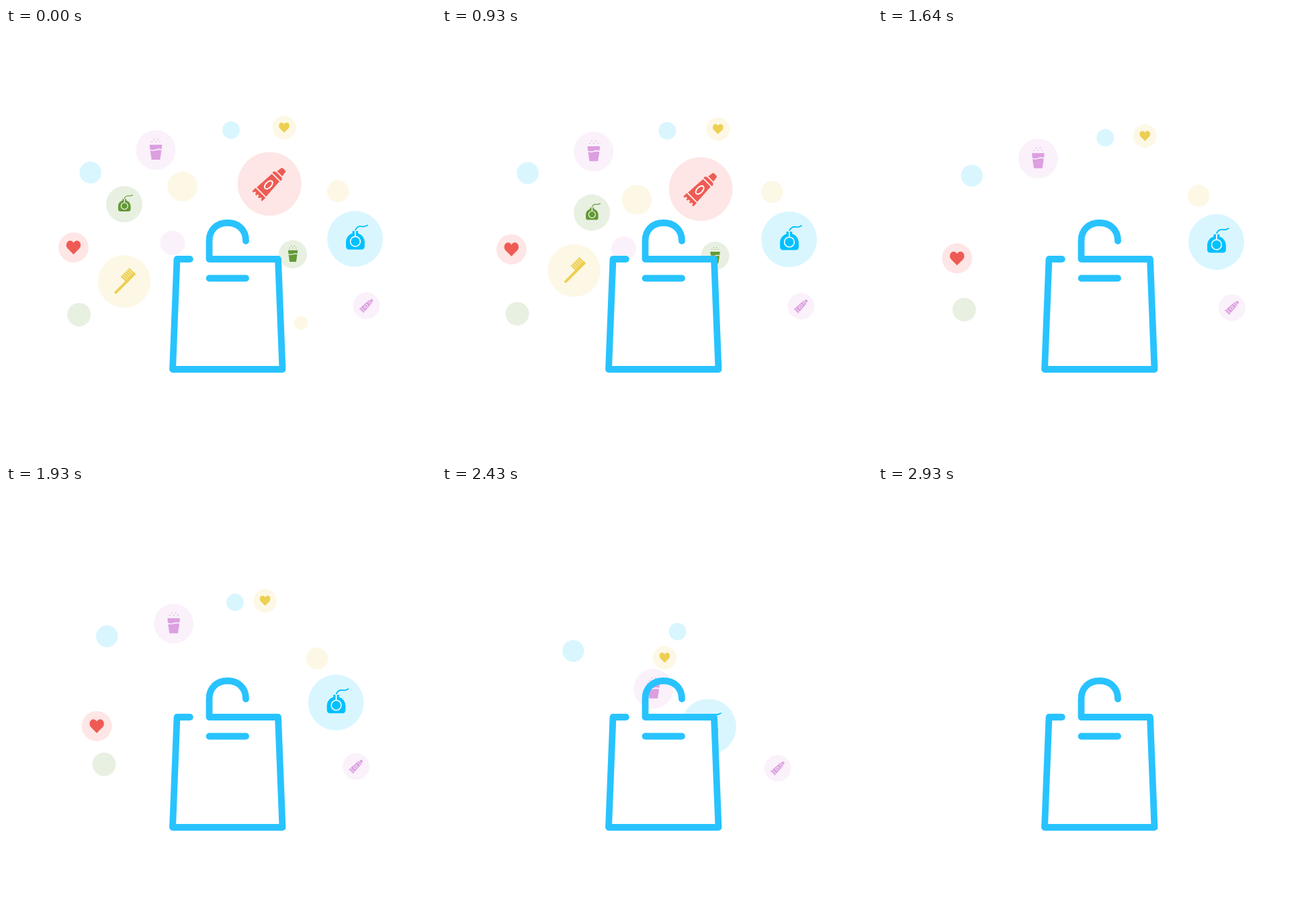
Recreate the animation shown at these times as an HTML page. Size 640 by 640 pixels, loop 8000 ms.

```html
<!DOCTYPE html>
<html lang="en">
<head>
<meta charset="utf-8">
<title>Shopping bag</title>
<style>
  html, body { margin: 0; width: 100%; height: 100%; overflow: hidden; background: #fff; }
  svg { display: block; width: 100vw; height: 100vh; }
</style>
</head>
<body>
<svg viewBox="0 0 640 640">
  <defs>
    <path id="heart" d="M0 10.3 L-8.7 1.6 C-13 -3.2 -9.8 -10.2 -5.2 -10.2 C-2.7 -10.2 -1 -8.6 0 -6.8 C1 -8.6 2.7 -10.2 5.2 -10.2 C9.8 -10.2 13 -3.2 8.7 1.6 Z"/>
    <g id="cup">
      <path d="M-9.3 -8 H9.3 L8.6 -1.2 Q4.5 -3 0 -1.2 T-8.6 -1.2 Z"/>
      <path d="M-8.4 .6 Q-4.5 2 0 .5 T8.4 .6 L6.3 14.4 H-6.3 Z"/>
      <path d="M-3 -16 h0 M3 -16 h0 M-6 -12.4 h0 M0 -12.4 h0 M6 -12.4 h0" fill="none" stroke="currentColor" stroke-width="1.6" stroke-linecap="round"/>
    </g>
    <g id="spray">
      <path d="M-4 -11.5 H4.6 V-8 C10 -6.5 14.3 -1.5 14.3 5 V11 Q14.3 16 9.5 16 H-8.7 Q-13.5 16 -13.5 11 V5 C-13.5 -1.5 -9.4 -6.5 -4 -8 Z"/>
      <path d="M.4 -12 V-3.6" fill="none" stroke="#fff" stroke-width="1.9"/>
      <circle cx=".4" cy="4" r="7.4" fill="none" stroke="#fff" stroke-width="1.6"/>
      <path d="M.5 -13.2 C3 -18 6 -19.2 10 -18.4 S15 -18.8 18.4 -20.2" fill="none" stroke="currentColor" stroke-width="1.8" stroke-linecap="round"/>
    </g>
    <g id="paste" transform="rotate(-45)">
      <path d="M-19 -10.5 V10.5 H-26 V7.5 H-23.5 V4.5 H-26 V1.5 H-23.5 V-1.5 H-26 V-4.5 H-23.5 V-7.5 H-26 V-10.5 Z"/>
      <path d="M-17 -9.8 L12.8 -8 V8 L-17 9.8 Z"/>
      <path d="M14.8 -8.8 H17.5 L19.5 -6 V6 L17.5 8.8 H14.8 Z"/>
      <path d="M21.5 -5.5 L29 -4.3 Q30.5 -4 30.5 -2 V2 Q30.5 4 29 4.3 L21.5 5.5 Z"/>
      <ellipse cx="-2" rx="7.4" ry="4.2" fill="none" stroke="#fff" stroke-width="2"/>
    </g>
    <g id="brush" transform="rotate(-45)" fill="none" stroke="currentColor">
      <path d="M-20.5 2.6 H18.5" stroke-width="4" stroke-linecap="round"/>
      <path d="M2.5 -9 V2 M5.7 -9 V2 M8.9 -9 V2 M12.1 -9 V2 M15.3 -9 V2 M18.5 -9 V2" stroke-width="2.4"/>
    </g>
  </defs>
  <g id="bubbles"></g>
  <path d="M254.5 344 L248 508 H411.5 L405 344 Z" fill="#fff"/>
  <path d="M273.8 344 H254.5 L248 508 H411.5 L405 344 H302.5 V317 C302.5 300 314 290 329.7 290 S357 300 357 317 M302.5 372.5 H357"
    fill="none" stroke="#28c3ff" stroke-width="9.8" stroke-linecap="round" stroke-linejoin="round"/>
</svg>
<script>
const LOOP = 8000, FPS = 14, LAST_STEP = 41;
const SVG = "http://www.w3.org/2000/svg";
const color = { red: "#ef5b54", yellow: "#edcf52", purple: "#dc9fe0", green: "#659a37", blue: "#00c0ff" };

// path: start, control, end; delay and span in ms; pull: easing strength
const specs = [
  { hue: "blue", r: 13, path: "335 152 Q380 300 335 425", delay: 555, span: 4140 },
  { hue: "yellow", r: 17.5, path: "414 148.3 Q300 225 320 400", delay: 200, span: 4470, icon: "heart", size: .73 },
  { hue: "purple", r: 29.5, path: "223 181.7 Q322 258 340 400", delay: 210, span: 4340, icon: "cup", size: 1 },
  { hue: "blue", r: 16.3, path: "125.7 215.3 Q260 255 330 400", delay: 396, span: 4400 },
  { hue: "yellow", r: 22.3, path: "262.5 235.8 Q330 265 330 420", delay: 430, span: 1200 },
  { hue: "green", r: 27, path: "176 262.2 Q285 274 330 420", delay: 230, span: 1590, icon: "spray", size: .67 },
  { hue: "red", r: 22.4, path: "100.5 326.7 Q192 418 330 438", delay: 200, span: 3835, pull: 1, icon: "heart", size: 1 },
  { hue: "purple", r: 18.5, path: "248 320 Q310 336 330 420", delay: 240, span: 1630 },
  { hue: "yellow", r: 39.2, path: "176 377.3 Q225 318 335 430", delay: 340, span: 1480, icon: "brush", size: 1 },
  { hue: "green", r: 17.5, path: "108.7 426.7 Q180 395 330 405", delay: 220, span: 4050 },
  { hue: "red", r: 47.4, path: "392.2 232 Q335 290 325 420", delay: 400, span: 1862, icon: "paste", size: 1 },
  { hue: "yellow", r: 16.4, path: "494.2 243 Q400 275 330 400", delay: 235, span: 3930, pull: 1 },
  { hue: "blue", r: 41.5, path: "519.5 313.8 Q430 339 330 390", delay: 200, span: 4310, icon: "spray", size: 1 },
  { hue: "green", r: 21, path: "427 336.8 Q370 335 330 420", delay: 400, span: 1300, icon: "cup", size: .77 },
  { hue: "purple", r: 19.8, path: "536.4 413.4 Q450 442 330 350", delay: 150, span: 5130, pull: 1, icon: "paste", size: .42 },
  { hue: "yellow", r: 10.4, path: "439 439 Q385 400 330 400", delay: 200, span: 1260 }
];

function add(parent, name, attrs) {
  const node = parent.appendChild(document.createElementNS(SVG, name));
  for (const key in attrs) node.setAttribute(key, attrs[key]);
  return node;
}

// Symmetric cubic ease with handles at (pull, 0) and (1 - pull, 1)
function ease(x, pull) {
  if (x <= 0) return 0;
  if (x >= 1) return 1;
  let lo = 0, hi = 1, u;
  for (let i = 0; i < 30; i++) {
    u = (lo + hi) / 2;
    const v = 1 - u;
    const at = 3 * pull * u * v * v + 3 * (1 - pull) * u * u * v + u * u * u;
    if (at < x) lo = u; else hi = u;
  }
  return u * u * (3 - 2 * u);
}

const layer = document.getElementById("bubbles");
const bubbles = specs.map(spec => {
  const fill = color[spec.hue];
  const node = add(layer, "g", { fill, color: fill });
  add(node, "circle", { r: spec.r, "fill-opacity": .15 });
  if (spec.icon) add(node, "use", { href: "#" + spec.icon, transform: `scale(${spec.size})` });
  const track = document.createElementNS(SVG, "path");
  track.setAttribute("d", "M" + spec.path);
  return { pull: .9, ...spec, node, track, length: track.getTotalLength() };
});

function render(ms) {
  const step = Math.floor((ms + 5) * FPS / 1000);
  layer.style.display = step >= LAST_STEP ? "none" : "";
  const now = Math.min(step, LAST_STEP) * 1000 / FPS;
  for (const b of bubbles) {
    const p = b.track.getPointAtLength(b.length * ease((now - b.delay) / b.span, b.pull));
    b.node.setAttribute("transform", `translate(${p.x} ${p.y})`);
  }
}

const start = performance.now();
function tick() {
  render((performance.now() - start) % LOOP);
  requestAnimationFrame(tick);
}
tick();
</script>
</body>
</html>
```
